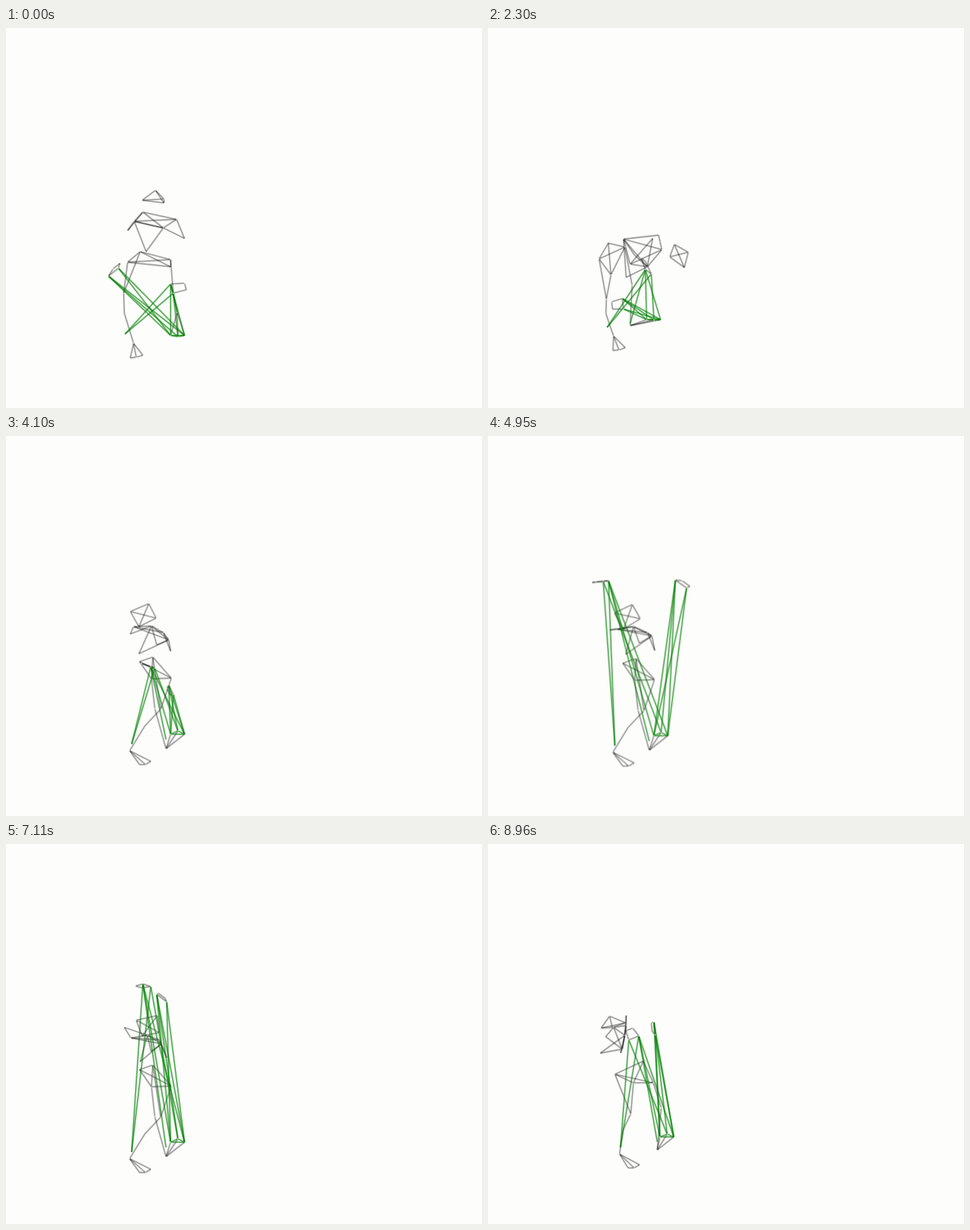
An HTML page without scripts for the animation above (9010 ms loop, 720 by 576 pixels).

```html
<!DOCTYPE html>
<html lang="en">
<head>
<meta charset="utf-8">
<title>Wire figure</title>
<style>
/* joints that move */
@property --h1x { syntax: "<number>"; inherits: true; initial-value: 0 }
@property --h1y { syntax: "<number>"; inherits: true; initial-value: 0 }
@property --h2x { syntax: "<number>"; inherits: true; initial-value: 0 }
@property --h2y { syntax: "<number>"; inherits: true; initial-value: 0 }
@property --h3x { syntax: "<number>"; inherits: true; initial-value: 0 }
@property --h3y { syntax: "<number>"; inherits: true; initial-value: 0 }
@property --h4x { syntax: "<number>"; inherits: true; initial-value: 0 }
@property --h4y { syntax: "<number>"; inherits: true; initial-value: 0 }
@property --nkx { syntax: "<number>"; inherits: true; initial-value: 0 }
@property --nky { syntax: "<number>"; inherits: true; initial-value: 0 }
@property --lsx { syntax: "<number>"; inherits: true; initial-value: 0 }
@property --lsy { syntax: "<number>"; inherits: true; initial-value: 0 }
@property --rsx { syntax: "<number>"; inherits: true; initial-value: 0 }
@property --rsy { syntax: "<number>"; inherits: true; initial-value: 0 }
@property --chx { syntax: "<number>"; inherits: true; initial-value: 0 }
@property --chy { syntax: "<number>"; inherits: true; initial-value: 0 }
@property --stx { syntax: "<number>"; inherits: true; initial-value: 0 }
@property --sty { syntax: "<number>"; inherits: true; initial-value: 0 }
@property --elx { syntax: "<number>"; inherits: true; initial-value: 0 }
@property --ely { syntax: "<number>"; inherits: true; initial-value: 0 }
@property --erx { syntax: "<number>"; inherits: true; initial-value: 0 }
@property --ery { syntax: "<number>"; inherits: true; initial-value: 0 }
@property --p1x { syntax: "<number>"; inherits: true; initial-value: 0 }
@property --p1y { syntax: "<number>"; inherits: true; initial-value: 0 }
@property --p2x { syntax: "<number>"; inherits: true; initial-value: 0 }
@property --p2y { syntax: "<number>"; inherits: true; initial-value: 0 }
@property --p3x { syntax: "<number>"; inherits: true; initial-value: 0 }
@property --p3y { syntax: "<number>"; inherits: true; initial-value: 0 }
@property --p4x { syntax: "<number>"; inherits: true; initial-value: 0 }
@property --p4y { syntax: "<number>"; inherits: true; initial-value: 0 }
@property --klx { syntax: "<number>"; inherits: true; initial-value: 0 }
@property --kly { syntax: "<number>"; inherits: true; initial-value: 0 }
@property --alx { syntax: "<number>"; inherits: true; initial-value: 0 }
@property --aly { syntax: "<number>"; inherits: true; initial-value: 0 }
@property --krx { syntax: "<number>"; inherits: true; initial-value: 0 }
@property --kry { syntax: "<number>"; inherits: true; initial-value: 0 }
@property --arx { syntax: "<number>"; inherits: true; initial-value: 0 }
@property --ary { syntax: "<number>"; inherits: true; initial-value: 0 }
@property --t1x { syntax: "<number>"; inherits: true; initial-value: 0 }
@property --t1y { syntax: "<number>"; inherits: true; initial-value: 0 }
@property --a1x { syntax: "<number>"; inherits: true; initial-value: 0 }
@property --a1y { syntax: "<number>"; inherits: true; initial-value: 0 }
@property --a2x { syntax: "<number>"; inherits: true; initial-value: 0 }
@property --a2y { syntax: "<number>"; inherits: true; initial-value: 0 }
@property --a3x { syntax: "<number>"; inherits: true; initial-value: 0 }
@property --a3y { syntax: "<number>"; inherits: true; initial-value: 0 }
@property --b1x { syntax: "<number>"; inherits: true; initial-value: 0 }
@property --b1y { syntax: "<number>"; inherits: true; initial-value: 0 }
@property --b2x { syntax: "<number>"; inherits: true; initial-value: 0 }
@property --b2y { syntax: "<number>"; inherits: true; initial-value: 0 }
@property --b3x { syntax: "<number>"; inherits: true; initial-value: 0 }
@property --b3y { syntax: "<number>"; inherits: true; initial-value: 0 }
@property --turn { syntax: "<number>"; inherits: true; initial-value: 0 }
@property --out { syntax: "<number>"; inherits: true; initial-value: 0 }

html, body { margin: 0; width: 100%; height: 100%; overflow: hidden; background: #fdfdfc; }
svg {
  display: block; width: 720px; height: 576px;
  animation: trunk 9.01s linear infinite, legs 9.01s linear infinite,
    arms 9.01s linear infinite, swing 9.01s linear infinite;
  /* joints that follow others */
  --mdx: calc((var(--lsx) + var(--chx)) / 2 - 5 * var(--turn));
  --mdy: calc((var(--lsy) + var(--chy)) / 2 + 18 * var(--turn));
  --slx: calc(.6 * var(--klx) + .4 * var(--alx) - 5);
  --sly: calc(.6 * var(--kly) + .4 * var(--aly));
  --f1x: calc(var(--alx) - 5 + 20 * var(--turn));
  --f1y: calc(var(--aly) + 22 - var(--turn));
  --f2x: calc(var(--alx) + 4 + 20 * var(--turn));
  --f2y: calc(var(--aly) + 21);
  --f3x: calc(var(--alx) + 14 + 18 * var(--turn));
  --f3y: calc(var(--aly) + 18 - 2 * var(--turn));
  --glx: calc(var(--alx) - 13 + 16 * var(--turn));
  --gly: calc(var(--aly) - 14 + 4 * var(--turn));
  --grx: var(--arx);
  --gry: calc(var(--ary) - 14 * var(--turn));
  --t2x: calc(var(--t1x) + 11);
  --t2y: calc(var(--t1y) + 2 - 7 * var(--turn));
  --t3x: calc(var(--t1x) + 21);
  --a4x: calc(var(--a3x) + .7 * (var(--a2x) - var(--a1x)));
  --a4y: calc(var(--a3y) + .7 * (var(--a2y) - var(--a1y)));
  --b4x: calc(var(--b3x) + .7 * (var(--b2x) - var(--b1x)));
  --b4y: calc(var(--b3y) + .7 * (var(--b2y) - var(--b1y)));
  --ao: calc(var(--out) / 4);
}
.rig { animation: drift 9.01s linear infinite; }

/* a unit line turned and scaled from (x, y) to (u, v) */
path {
  d: path("M0 0H1"); fill: none; stroke-width: 2.3; vector-effect: non-scaling-stroke;
  --dx: calc(var(--u) - var(--x));
  --dy: calc(var(--v) - var(--y));
  transform: matrix(var(--dx), var(--dy), calc(-1 * var(--dy)), var(--dx), var(--x), var(--y));
}
circle {
  r: 1.3px; fill: #ffffe8; fill-opacity: .5;
  transform: translate(calc(var(--x) * 1px), calc(var(--y) * 1px));
}
.body path { stroke: #000; stroke-opacity: .34; }
.ties path { stroke: #008000; stroke-opacity: .6; }

/* line starts */
.h1 { --x: var(--h1x); --y: var(--h1y) }
.h2 { --x: var(--h2x); --y: var(--h2y) }
.h3 { --x: var(--h3x); --y: var(--h3y) }
.nk { --x: var(--nkx); --y: var(--nky) }
.ls { --x: var(--lsx); --y: var(--lsy) }
.rs { --x: var(--rsx); --y: var(--rsy) }
.ch { --x: var(--chx); --y: var(--chy) }
.p1 { --x: var(--p1x); --y: var(--p1y) }
.p2 { --x: var(--p2x); --y: var(--p2y) }
.p3 { --x: var(--p3x); --y: var(--p3y) }
.kl { --x: var(--klx); --y: var(--kly) }
.al { --x: var(--alx); --y: var(--aly) }
.kr { --x: var(--krx); --y: var(--kry) }
.ar { --x: var(--arx); --y: var(--ary) }
.f2 { --x: var(--f2x); --y: var(--f2y) }
.t1 { --x: var(--t1x); --y: var(--t1y) }
.t2 { --x: var(--t2x); --y: var(--t2y) }
.a1 { --x: calc(var(--a1x) + var(--ao)); --y: var(--a1y) }
.a2 { --x: calc(var(--a2x) + var(--ao)); --y: var(--a2y) }
.a3 { --x: calc(var(--a3x) + var(--ao)); --y: var(--a3y) }
.b1 { --x: calc(var(--b1x) + var(--out)); --y: var(--b1y) }
.b2 { --x: calc(var(--b2x) + var(--out)); --y: var(--b2y) }
.b3 { --x: calc(var(--b3x) + var(--out)); --y: var(--b3y) }

/* line ends */
.to-h2 { --u: var(--h2x); --v: var(--h2y) }
.to-h3 { --u: var(--h3x); --v: var(--h3y) }
.to-h4 { --u: var(--h4x); --v: var(--h4y) }
.to-ls { --u: var(--lsx); --v: var(--lsy) }
.to-rs { --u: var(--rsx); --v: var(--rsy) }
.to-ch { --u: var(--chx); --v: var(--chy) }
.to-st { --u: var(--stx); --v: var(--sty) }
.to-el { --u: var(--elx); --v: var(--ely) }
.to-er { --u: var(--erx); --v: var(--ery) }
.to-md { --u: var(--mdx); --v: var(--mdy) }
.to-p2 { --u: var(--p2x); --v: var(--p2y) }
.to-p3 { --u: var(--p3x); --v: var(--p3y) }
.to-p4 { --u: var(--p4x); --v: var(--p4y) }
.to-kl { --u: var(--klx); --v: var(--kly) }
.to-sl { --u: var(--slx); --v: var(--sly) }
.to-kr { --u: var(--krx); --v: var(--kry) }
.to-ar { --u: var(--arx); --v: var(--ary) }
.to-f1 { --u: var(--f1x); --v: var(--f1y) }
.to-f2 { --u: var(--f2x); --v: var(--f2y) }
.to-f3 { --u: var(--f3x); --v: var(--f3y) }
.to-gl { --u: var(--glx); --v: var(--gly) }
.to-gr { --u: var(--grx); --v: var(--gry) }
.to-t1 { --u: var(--t1x); --v: var(--t1y) }
.to-t2 { --u: var(--t2x); --v: var(--t2y) }
.to-t3 { --u: var(--t3x); --v: var(--t1y) }
.to-a2 { --u: calc(var(--a2x) + var(--ao)); --v: var(--a2y) }
.to-a3 { --u: calc(var(--a3x) + var(--ao)); --v: var(--a3y) }
.to-a4 { --u: calc(var(--a4x) + var(--ao)); --v: var(--a4y) }
.to-b2 { --u: calc(var(--b2x) + var(--out)); --v: var(--b2y) }
.to-b3 { --u: calc(var(--b3x) + var(--out)); --v: var(--b3y) }
.to-b4 { --u: calc(var(--b4x) + var(--out)); --v: var(--b4y) }

/* poses: head and chest */
@keyframes trunk {
  0% { --h1x:206; --h1y:261; --h2x:226; --h2y:246; --h3x:239; --h3y:259; --h4x:239; --h4y:265;
    --nkx:207; --nky:279; --lsx:194; --lsy:293; --rsx:258; --rsy:290; --chx:238; --chy:303;
    --stx:212; --sty:339; --elx:184; --ely:307; --erx:270; --ery:319 }
  13.98% { --h1x:208; --h1y:323; --h2x:233; --h2y:308; --h3x:248; --h3y:329; --h4x:222; --h4y:344;
    --nkx:198; --nky:304; --lsx:175; --lsy:319; --rsx:231; --rsy:296; --chx:248; --chy:329;
    --stx:193; --sty:364; --elx:165; --ely:351; --erx:247; --ery:301 }
  25.53% { --h1x:275; --h1y:347; --h2x:282; --h2y:328; --h3x:303; --h3y:340; --h4x:297; --h4y:363;
    --nkx:263; --nky:336; --lsx:205; --lsy:320; --rsx:215; --rsy:358; --chx:241; --chy:362;
    --stx:209; --sty:378; --elx:258; --ely:314; --erx:249; --ery:319 }
  45.5% { --h1x:188; --h1y:266; --h2x:216; --h2y:254; --h3x:227; --h3y:276; --h4x:201; --h4y:289;
    --nkx:193; --nky:289; --lsx:220; --lsy:288; --rsx:238; --rsy:298; --chx:246; --chy:309;
    --stx:201; --sty:330; --elx:188; --ely:300; --erx:249; --ery:326 }
  65.93% { --h1x:191; --h1y:266; --h2x:217; --h2y:252; --h3x:230; --h3y:273; --h4x:206; --h4y:292;
    --nkx:194; --nky:292; --lsx:216; --lsy:285; --rsx:241; --rsy:293; --chx:246; --chy:291;
    --stx:213; --sty:327; --elx:176; --ely:282; --erx:252; --ery:319 }
  78.91% { --h1x:197; --h1y:267; --h2x:229; --h2y:260; --h3x:232; --h3y:286; --h4x:206; --h4y:291;
    --nkx:189; --nky:294; --lsx:214; --lsy:290; --rsx:232; --rsy:297; --chx:235; --chy:303;
    --stx:203; --sty:330; --elx:179; --ely:278; --erx:243; --ery:324 }
  99.45%, 100% { --h1x:171; --h1y:279; --h2x:184; --h2y:261; --h3x:208; --h3y:271; --h4x:188; --h4y:278;
    --nkx:190; --nky:278; --lsx:203; --lsy:311; --rsx:209; --rsy:275; --chx:207; --chy:290;
    --stx:170; --sty:317; --elx:178; --ely:292; --erx:209; --ery:260 }
}
@keyframes legs {
  0% { --p1x:203; --p1y:339; --p2x:249; --p2y:351; --p3x:184; --p3y:355; --p4x:249; --p4y:362;
    --klx:178; --kly:402; --alx:193; --aly:478; --krx:253; --kry:402; --arx:259; --ary:431;
    --t1x:249; --t1y:466; --turn:0 }
  13.98% { --p1x:193; --p1y:364; --p2x:250; --p2y:338; --p3x:181; --p3y:339; --p4x:248; --p4y:331;
    --klx:189; --kly:395; --alx:202; --aly:464; --krx:261; --kry:388; --arx:259; --ary:420;
    --t1x:260; --t1y:454; --turn:.1 }
  25.53% { --p1x:186; --p1y:374; --p2x:207; --p2y:332; --p3x:168; --p3y:350; --p4x:182; --p4y:326;
    --klx:179; --kly:411; --alx:190; --aly:467; --krx:218; --kry:390; --arx:215; --ary:451;
    --t1x:240; --t1y:442; --turn:.2 }
  45.5%, 65.93%, 78.91% { --p1x:222; --p1y:335; --p2x:220; --p2y:368; --p3x:250; --p3y:367; --p4x:202; --p4y:342;
    --klx:234; --kly:414; --alx:187; --aly:477; --krx:225; --kry:413; --arx:242; --ary:474;
    --t1x:249; --t1y:452; --turn:1 }
  99.45%, 100% { --p1x:220; --p1y:362; --p2x:250; --p2y:362; --p3x:192; --p3y:349; --p4x:235; --p4y:329;
    --klx:216; --kly:409; --alx:199; --aly:470; --krx:262; --kry:400; --arx:256; --ary:464;
    --t1x:260; --t1y:444; --turn:.9 }
}
@keyframes arms {
  0% { --a1x:249; --a1y:388; --a2x:253; --a2y:402; --a3x:270; --a3y:387;
    --b1x:155; --b1y:376; --b2x:170; --b2y:364; --b3x:162; --b3y:365 }
  13.98% { --a1x:261; --a1y:349; --a2x:273; --a2y:358; --a3x:269; --a3y:336;
    --b1x:189; --b1y:393; --b2x:189; --b2y:411; --b3x:167; --b3y:391 }
  25.53% { --a1x:238; --a1y:366; --a2x:247; --a2y:373; --a3x:232; --a3y:349;
    --b1x:203; --b1y:410; --b2x:205; --b2y:426; --b3x:187; --b3y:415 }
  45.5% { --a1x:219; --a1y:350; --a2x:225; --a2y:352; --a3x:205; --a3y:345;
    --b1x:246; --b1y:378; --b2x:253; --b2y:392; --b3x:243; --b3y:383 }
  52%, 65.93% { --a1x:166; --a1y:217; --a2x:158; --a2y:218; --a3x:147; --a3y:219;
    --b1x:224; --b1y:216; --b2x:241; --b2y:228; --b3x:234; --b3y:217 }
  78.91% { --a1x:207; --a1y:212; --a2x:219; --a2y:216; --a3x:196; --a3y:215;
    --b1x:228; --b1y:228; --b2x:243; --b2y:239; --b3x:230; --b3y:226 }
  99.45%, 100% { --a1x:228; --a1y:291; --a2x:213; --a2y:297; --a3x:219; --a3y:279;
    --b1x:251; --b1y:270; --b2x:253; --b2y:289; --b3x:247; --b3y:271 }
}
/* hands reach sideways between poses */
@keyframes swing {
  0%, 13.98%, 45.5%, 65.93%, 100% { --out: 0 }
  6% { --out: -24 }
  52% { --out: 73 }
}
@keyframes drift {
  0%, 45.5%, 78.91%, 100% { transform: translate(0px, 0px) }
  65.93% { transform: translate(4px, 5px) }
}
</style>
</head>
<body>
<svg viewBox="0 0 720 576">
<g class="rig">
  <g class="body">
    <g class="h1"><path class="to-h2"/><path class="to-h3"/><path class="to-h4"/><circle/></g>
    <g class="h2"><path class="to-h3"/><path class="to-h4"/><circle/></g>
    <g class="h3"><path class="to-h4"/><circle/></g>

    <g class="nk"><path class="to-ls"/><path class="to-rs"/><path class="to-ch"/><path class="to-el"/><circle/></g>
    <g class="ls"><path class="to-rs"/><path class="to-ch"/><path class="to-md"/><path class="to-st"/><path class="to-el"/><circle/></g>
    <g class="rs"><path class="to-ch"/><path class="to-er"/><circle/></g>
    <g class="ch"><path class="to-md"/><path class="to-st"/><path class="to-er"/><circle/></g>

    <g class="p1"><path class="to-p2"/><path class="to-p3"/><path class="to-p4"/><path class="to-kl"/><circle/></g>
    <g class="p2"><path class="to-p3"/><path class="to-p4"/><path class="to-kr"/><circle/></g>
    <g class="p3"><path class="to-p4"/><path class="to-kl"/><circle/></g>

    <g class="kl"><path class="to-sl"/><circle/></g>
    <g class="al"><path class="to-sl"/><path class="to-f1"/><path class="to-f2"/><path class="to-f3"/><circle/></g>
    <g class="f2"><path class="to-f1"/><path class="to-f3"/><circle/></g>
    <g class="kr"><path class="to-ar"/><circle/></g>
    <g class="ar"><path class="to-t1"/><path class="to-t2"/><path class="to-t3"/><circle/></g>

    <g class="a1"><path class="to-a2"/><path class="to-a3"/></g>
    <g class="a2"><path class="to-a4"/></g>
    <g class="a3"><path class="to-a4"/><circle/></g>
    <g class="b1"><path class="to-b2"/><path class="to-b3"/></g>
    <g class="b2"><path class="to-b4"/></g>
    <g class="b3"><path class="to-b4"/><circle/></g>
  </g>
  <g class="ties">
    <g class="a1"><path class="to-gl"/><path class="to-gr"/><path class="to-t1"/><path class="to-t3"/><circle/></g>
    <g class="a2"><path class="to-gl"/><path class="to-t2"/><circle/></g>
    <g class="b1"><path class="to-t1"/><path class="to-t2"/><path class="to-t3"/><circle/></g>
    <g class="b2"><path class="to-t1"/><path class="to-t3"/><circle/></g>
    <g class="t1"><path class="to-t2"/><path class="to-t3"/><circle/></g>
    <g class="t2"><path class="to-t3"/><circle/></g>
  </g>
</g>
</svg>
</body>
</html>
```
